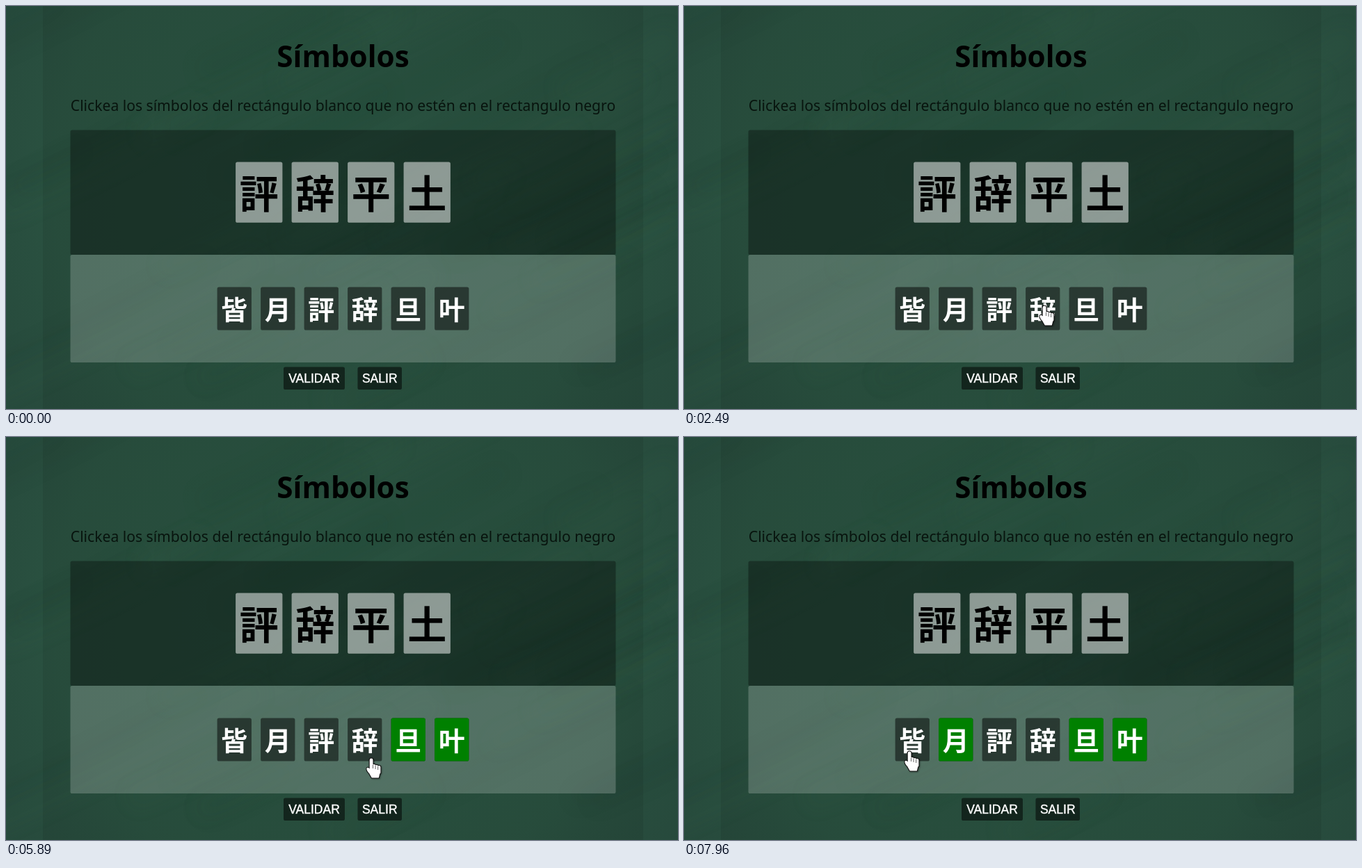
Recreate the animation shown at these times as an HTML page with a canvas. Size 966 by 580 pixels, loop 8 s.

```html
<!DOCTYPE html>
<html lang="es">
<head>
<meta charset="utf-8">
<title>Símbolos</title>
<style>
html, body { margin: 0; width: 100%; height: 100%; overflow: hidden; background: #2a5041; }
canvas { display: block; width: 966px; height: 580px; }
</style>
</head>
<body>
<canvas id="stage" width="966" height="580"></canvas>
<script>
const W = 966, H = 580, MID = 484.5;
const LOOP = 8000, ENTER = 500, STEP = 71.05;
const FLASH = 140, TURN = 125;
const SANS = '"Noto Sans", sans-serif';
const CJK = '"Noto Sans CJK JP", "Noto Sans CJK", sans-serif';
const ARIAL = '"Liberation Sans", Arial, sans-serif';
const ctx = document.getElementById('stage').getContext('2d');

// Where the pointer turns or rests
const PATH = [
  { t: 500, x: 567, y: 96 },
  { t: 1000, x: 464, y: 528 },
  { t: 1270, x: 429, y: 517 },
  { t: 1800, x: 391, y: 403 },
  { t: 2490, x: 520, y: 432 },
  { t: 3520, x: 625, y: 443 },
  { t: 4110, x: 625, y: 443 },
  { t: 4650, x: 590, y: 456 },
  { t: 4860, x: 581, y: 453 },
  { t: 5120, x: 581, y: 453 },
  { t: 5890, x: 527, y: 463 },
  { t: 6720, x: 400, y: 445 },
  { t: 7050, x: 389, y: 442 },
  { t: 7280, x: 366, y: 500 },
  { t: 7960, x: 325, y: 453 }
];
const CLICKS = [{ ch: '叶', t: 4110 }, { ch: '旦', t: 5120 }, { ch: '月', t: 6980 }];

// Evenly spaced cards centred on the stage
function cardRow(text, y, w, h) {
  const pitch = w + 13.2, left = MID - (pitch * text.length - 13.2) / 2;
  return [...text].map((ch, i) => ({ ch, x: left + pitch * i, y, w, h }));
}

const bigCards = cardRow('評辞平土', 224.5, 67.3, 87.3);
const smallCards = cardRow('皆月評辞旦叶', 404.5, 49.3, 62);
const buttons = [
  { ch: 'VALIDAR', x: 399, y: 519.5, w: 88, h: 32.5 },
  { ch: 'SALIR', x: 505.5, y: 519.5, w: 63.5, h: 32.5 }
];

function box(c, { x, y, w, h }, fill) {
  c.fillStyle = fill;
  c.beginPath();
  c.roundRect(x, y, w, h, 2.6);
  c.fill();
}

function label(c, str, x, y, font, fill) {
  c.font = font;
  c.fillStyle = fill;
  c.textAlign = 'center';
  c.fillText(str, x, y);
}

function paintBoard(c) {
  c.fillStyle = '#2a4f40';
  c.fillRect(0, 0, W, H);
  const glow = c.createRadialGradient(480, 260, 60, 480, 260, 600);
  glow.addColorStop(0, 'rgba(44,92,70,0.75)');
  glow.addColorStop(0.65, 'rgba(42,84,65,0.5)');
  glow.addColorStop(1, 'rgba(32,62,52,0.35)');
  c.fillStyle = glow;
  c.fillRect(0, 0, W, H);

  // Soft diagonal chalk smears
  let seed = 11;
  const rnd = () => (seed = seed * 16807 % 2147483647) / 2147483647;
  c.save();
  c.filter = 'blur(14px)';
  for (let i = 0; i < 40; i++) {
    const x = rnd() * W, y = rnd() * H, len = 60 + rnd() * 150;
    c.strokeStyle = i % 2 ? 'rgba(80,140,108,0.05)' : 'rgba(10,34,26,0.05)';
    c.lineWidth = 14 + rnd() * 26;
    c.beginPath();
    c.moveTo(x - len, y + len / 2);
    c.quadraticCurveTo(x, y + 10, x + len, y - len / 2);
    c.stroke();
  }
  c.restore();
  c.fillStyle = 'rgba(0,0,0,0.08)';
  c.fillRect(53, 0, 863, H);
}

function paintScene() {
  const cv = document.createElement('canvas');
  cv.width = W;
  cv.height = H;
  const c = cv.getContext('2d');
  paintBoard(c);
  label(c, 'Símbolos', MID, 88, `bold 42.2px ${SANS}`, '#000');
  label(c, 'Clickea los símbolos del rectángulo blanco que no estén en el rectangulo negro',
    MID, 150.5, `21.12px ${SANS}`, '#08140e');
  box(c, { x: 92.5, y: 178.5, w: 784, h: 179.5 }, 'rgba(0,0,0,0.34)');
  box(c, { x: 92.5, y: 358, w: 784, h: 155 }, 'rgba(255,255,255,0.2)');
  for (const b of bigCards) {
    box(c, b, 'rgba(255,255,255,0.5)');
    label(c, b.ch, b.x + b.w / 2, 290.6, `bold 56px ${CJK}`, '#000');
  }
  for (const s of smallCards) box(c, s, 'rgba(0,0,0,0.5)');
  c.strokeStyle = '#fff';
  c.lineWidth = 0.4;
  for (const b of buttons) {
    const x = b.x + b.w / 2;
    box(c, b, 'rgba(0,0,0,0.52)');
    label(c, b.ch, x, 542, `17.55px ${ARIAL}`, '#fff');
    c.strokeText(b.ch, x, 542);
  }
  return cv;
}

// Monotone cubic slope of one coordinate at point i
function slope(i, k) {
  const a = PATH[i - 1], b = PATH[i], d = PATH[i + 1];
  if (!a || !d) return 0;
  const l = (b[k] - a[k]) / (b.t - a.t), r = (d[k] - b[k]) / (d.t - b.t);
  return l * r <= 0 ? 0 : 2 * l * r / (l + r);
}

function pointerAt(t) {
  const end = PATH.findIndex(p => p.t > t);
  if (end < 0) return PATH.at(-1);
  const a = PATH[end - 1], b = PATH[end], h = b.t - a.t, u = (t - a.t) / h, v = 1 - u;
  const mix = k => a[k] * (1 + 2 * u) * v * v + b[k] * (1 + 2 * v) * u * u +
    h * u * v * (slope(end - 1, k) * v - slope(end, k) * u);
  return { x: mix('x'), y: mix('y') };
}

function arrowShape() {
  const p = new Path2D('M0 0 L15.3 15.2 L0 21 Z');
  p.addPath(new Path2D('M4 13 L7.5 12 L11.6 22.7 L8 24.2 Z'));
  return p;
}

function handShape() {
  const p = new Path2D('M-2.4 14 H13.2 V18 L10.8 27.4 H0.8 L-3.6 20 Z');
  p.roundRect(-2.3, -0.4, 4.8, 18, 2.4);
  for (let i = 0; i < 3; i++) p.roundRect(2 + 3.6 * i, 8 + i, 4.2, 12, 2.1);
  p.ellipse(-3.4, 17, 2.2, 4.6, -0.55, 0, Math.PI * 2);
  return p;
}

const ARROW = arrowShape(), HAND = handShape();
const scene = paintScene();

function drawPointer({ x, y }) {
  const inside = r => x >= r.x && x <= r.x + r.w && y >= r.y && y <= r.y + r.h;
  const hand = smallCards.some(inside) || buttons.some(inside);
  const shape = hand ? HAND : ARROW;
  ctx.save();
  ctx.translate(Math.round(x - (hand ? 1.5 : 0)), Math.round(y));
  ctx.lineJoin = 'round';
  ctx.lineWidth = 2.2;
  ctx.strokeStyle = '#111';
  ctx.shadowColor = 'rgba(0,0,0,0.4)';
  ctx.shadowBlur = 2;
  ctx.shadowOffsetX = ctx.shadowOffsetY = 1;
  ctx.stroke(shape);
  ctx.shadowColor = 'transparent';
  ctx.fillStyle = '#fff';
  ctx.fill(shape);
  if (hand) {
    ctx.fillStyle = '#555';
    for (let i = 0; i < 3; i++) ctx.fillRect(2 + 3.6 * i, 9 + i, 0.9, 5);
  }
  ctx.restore();
}

function draw(t) {
  ctx.drawImage(scene, 0, 0);
  for (const s of smallCards) {
    if (CLICKS.some(c => c.ch === s.ch && t >= c.t + TURN)) box(ctx, s, '#008000');
    label(ctx, s.ch, s.x + s.w / 2, 451.4, `bold 38px ${CJK}`, '#fff');
  }
  if (t < ENTER) return;

  // The pointer moves in short, even steps
  const step = Math.floor((t - ENTER + 15) / STEP);
  const tip = pointerAt(ENTER + step * STEP);
  if (CLICKS.some(c => t >= c.t && t < c.t + FLASH)) {
    ctx.fillStyle = 'rgba(236,226,20,0.62)';
    ctx.beginPath();
    ctx.arc(tip.x - 2, tip.y - 0.5, 17, 0, Math.PI * 2);
    ctx.fill();
  }
  drawPointer(tip);
}

const start = performance.now();
function frame() {
  draw((performance.now() - start) % LOOP);
  requestAnimationFrame(frame);
}
frame();
</script>
</body>
</html>
```
